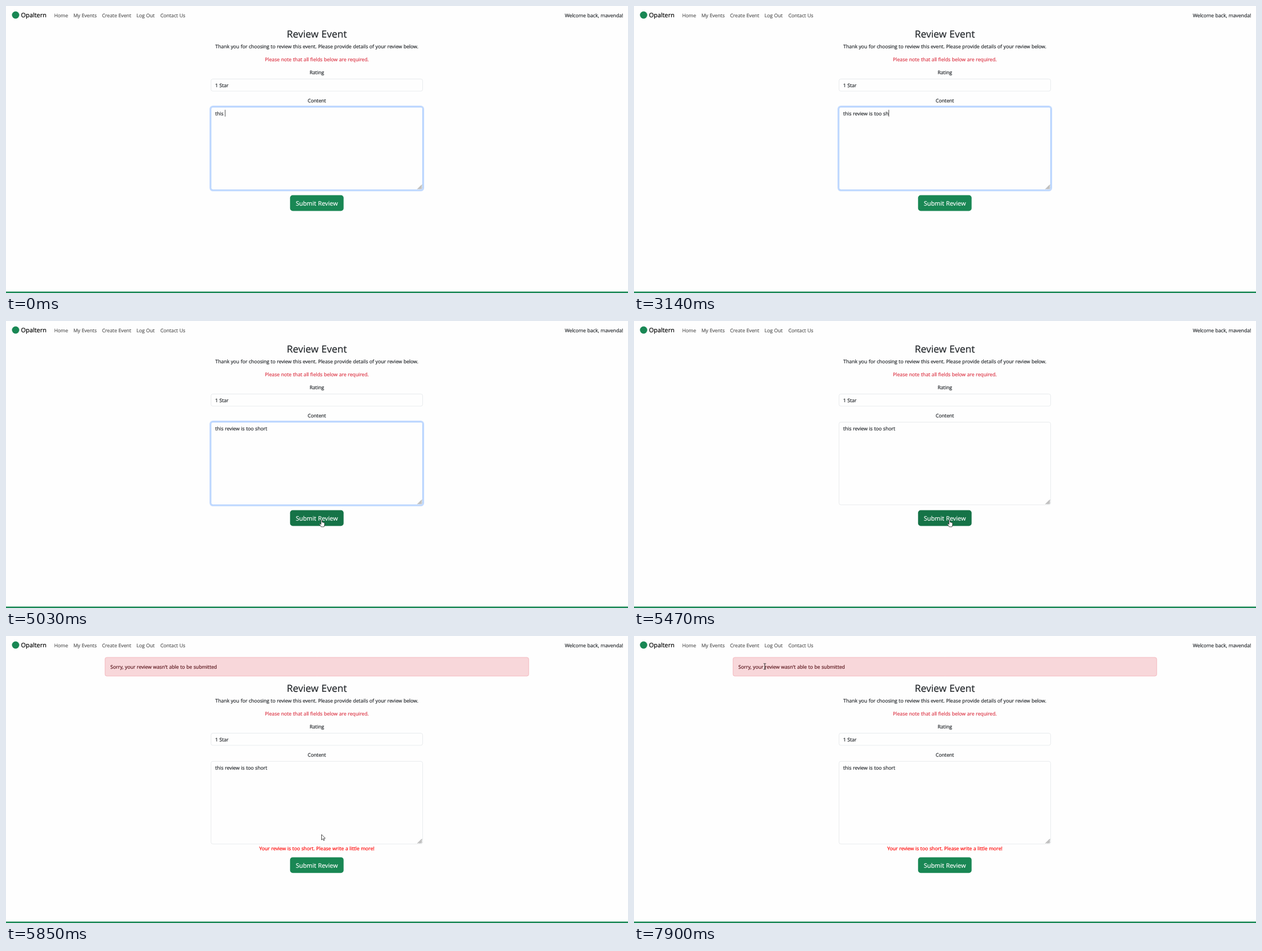
An HTML page with a canvas for the animation above (8 s loop, 1101x509 px).

```html
<!DOCTYPE html>
<html lang="en">
<head>
<meta charset="utf-8">
<title>Review Event</title>
<style>
  html, body { margin: 0; width: 100%; height: 100%; overflow: hidden; background: #fefefe; }
  canvas { display: block; }
</style>
</head>
<body>
<canvas id="stage" width="1101" height="509"></canvas>
<script>
const ctx = document.getElementById('stage').getContext('2d');
const LOOP = 8000;
const MID = 550.2;
const FIELD = { x: 362.6, w: 375.2 };
const BODY = 8.7, LARGE = 10.88, TITLE = 17.4;
const INK = '#212529', GREEN = '#198754', PAPER = '#fefefe', BORDER = '#dee2e6';
const REVIEW = 'this review is too short';

// [time, number of characters typed]
const typing = [
  [0, 5], [650, 0], [1310, 2], [1450, 4], [1590, 6], [1840, 7], [1990, 8],
  [2110, 10], [2230, 11], [2350, 13], [2480, 15], [2600, 16], [2720, 17],
  [2860, 18], [2980, 20], [3140, 21], [3290, 22], [3410, 24]
];
// [time, caret shown]
const blinking = [
  [0, true], [530, false], [650, true], [1190, false], [1310, true],
  [3950, false], [4430, true], [5030, false]
];
// [time, pointer shape, x, y]
const pointing = [
  [0, null],
  [3950, 'beam', 454.5, 182.5], [4070, 'beam', 461, 190], [4190, 'beam', 480, 212],
  [4310, 'beam', 516, 250], [4430, 'beam', 556.5, 294.5], [4550, 'beam', 572, 322],
  [4670, 'arrow', 575.5, 371], [4790, 'hand', 565, 356], [4910, 'hand', 560, 353],
  [5030, 'hand', 558.5, 352], [5730, 'arrow', 558.5, 352],
  [5970, 'beam', 556.5, 351.5], [6220, 'beam', 549.5, 319.5],
  [6370, 'arrow', 380.5, 117.5], [6520, 'arrow', 322, 73], [6650, 'beam', 304.5, 56],
  [6790, 'arrow', 262, 43], [6910, 'arrow', 205, 39.5], [7040, 'beam', 187.5, 56],
  [7160, 'arrow', 225, 83], [7280, 'arrow', 299, 80], [7420, 'beam', 368, 58],
  [7540, 'arrow', 345, 36], [7660, 'arrow', 290, 29.5], [7780, 'arrow', 240, 37],
  [7900, 'beam', 231.5, 54]
];
const focusing = [[0, 1], [5310, 0.5], [5470, 0]];
const hovering = [[0, 0], [4790, 0.5], [4910, 1], [5730, 0]];

// Latest entry whose time has come.
const at = (track, t) => track.filter(([start]) => start <= t).pop();
const mix = (a, b, k) => `rgb(${a.map((v, i) => Math.round(v + (b[i] - v) * k))})`;

function text(str, x, y, { size = BODY, color = INK, align = 'left' } = {}) {
  ctx.font = `${size}px "Open Sans", "Noto Sans", sans-serif`;
  ctx.wordSpacing = `${size * 0.03}px`;
  ctx.textAlign = align;
  ctx.fillStyle = ctx.strokeStyle = color;
  ctx.lineWidth = 0.2;
  ctx.fillText(str, x, y);
  ctx.strokeText(str, x, y);
}

const centered = (str, y, options) => text(str, MID, y, { align: 'center', ...options });

function box(x, y, w, h, { fill, stroke, radius = 3.5 }) {
  ctx.beginPath();
  ctx.roundRect(x, y, w, h, radius);
  ctx.fillStyle = fill;
  ctx.fill();
  if (!stroke) return;
  ctx.beginPath();
  ctx.roundRect(x + 0.3, y + 0.3, w - 0.6, h - 0.6, radius - 0.3);
  ctx.strokeStyle = stroke;
  ctx.lineWidth = 0.7;
  ctx.stroke();
}

function lines(segments, color, width) {
  ctx.beginPath();
  for (const [x1, y1, x2, y2] of segments) {
    ctx.moveTo(x1, y1);
    ctx.lineTo(x2, y2);
  }
  ctx.strokeStyle = color;
  ctx.lineWidth = width;
  ctx.stroke();
}

function navbar(hasLogo) {
  const shift = hasLogo ? 0 : -18.5;
  const baseline = hasLogo ? 19.6 : 18.4;
  if (hasLogo) {
    ctx.beginPath();
    ctx.arc(17, 16, 6.5, 0, Math.PI * 2);
    ctx.fillStyle = GREEN;
    ctx.fill();
  }
  text('Opaltern', 26.6 + shift, hasLogo ? 19.8 : 19.1, { size: LARGE, color: '#000' });
  const links = [['Home', 85.2], ['My Events', 119.2], ['Create Event', 170],
                 ['Log Out', 230.9], ['Contact Us', 273.2]];
  for (const [label, x] of links) text(label, x + shift, baseline, { color: '#595959' });
  text('Welcome back, mavenda!', 1092.4, baseline, { align: 'right' });
}

function alertBox(y) {
  box(175, y, 750.5, 33.6, { fill: '#f8d7da', stroke: '#f1aeb5' });
  text("Sorry, your review wasn't able to be submitted", 184.8, y + 20.6, { color: '#58151c' });
}

function textarea(y, t) {
  const focus = at(focusing, t)[1];
  const h = 147.2;
  if (focus) {
    box(FIELD.x - 2.3, y - 2.3, FIELD.w + 4.6, h + 4.6,
      { fill: `rgba(13,110,253,${0.25 * focus})`, radius: 5.8 });
  }
  box(FIELD.x, y, FIELD.w, h,
    { fill: PAPER, stroke: mix([222, 226, 230], [134, 183, 254], focus) });

  const right = FIELD.x + FIELD.w - 1.5, bottom = y + h - 1.5;
  lines([7.5, 5, 2.5].map(d => [right - d, bottom, right, bottom - d]), '#444', 0.8);

  const typed = REVIEW.slice(0, at(typing, t)[1]);
  text(typed, 370.2, y + 14.8);
  if (focus && at(blinking, t)[1]) {
    ctx.fillStyle = '#222';
    ctx.fillRect(370.3 + ctx.measureText(typed).width, y + 5, 0.8, 12);
  }
}

function form(shift, failed, t) {
  ctx.save();
  ctx.translate(0, shift);
  centered('Review Event', 56.3, { size: TITLE });
  centered('Thank you for choosing to review this event. Please provide details of your review below.', 75);
  centered('Please note that all fields below are required.', 98.3, { color: '#dc3545' });
  centered('Rating', 121.4);
  box(FIELD.x, 129.2, FIELD.w, 22.1, { fill: PAPER, stroke: BORDER });
  text('1 Star', 370.2, 144);
  centered('Content', 171.3);
  textarea(179.1, t);
  if (failed) {
    centered('Your review is too short. Please write a little more!', 337.2, { color: '#f00' });
    ctx.translate(0, 13.9);
  }
  box(502.8, 335.6, 94.8, 27.8,
    { fill: mix([25, 135, 84], [21, 115, 71], at(hovering, t)[1]), radius: 4.6 });
  centered('Submit Review', 354.4, { size: LARGE, color: '#fff' });
  ctx.restore();
}

const outlines = {
  arrow: 'M0 0 L0 9.6 L2.2 7.6 L3.7 10.8 L5.2 10.1 L3.8 7 L6.7 6.8 Z',
  hand: 'M-.9 1 Q0 -.4 .9 1 L.9 5 Q2 4.1 2.6 5.4 Q3.7 4.6 4.2 5.9 Q5.4 5.5 5.5 7 ' +
        'L5.3 10 L4.4 13 L-.5 13 L-3.6 8.6 Q-3.5 7 -2 7.8 L-.9 9 Z'
};

function pointer([, shape, x, y]) {
  if (!shape) return;
  ctx.save();
  ctx.translate(x, y);
  if (shape === 'beam') {
    lines([[0, -4.7, 0, 4.7], [-2.2, -5, 2.2, -5], [-2.2, 5, 2.2, 5]], '#222', 0.9);
  } else {
    const path = new Path2D(outlines[shape]);
    ctx.fillStyle = '#fff';
    ctx.fill(path);
    ctx.strokeStyle = '#222';
    ctx.lineWidth = 0.8;
    ctx.lineJoin = 'round';
    ctx.stroke(path);
  }
  ctx.restore();
}

function draw(t) {
  const failed = t >= 5730;
  const hasLogo = !failed || t >= 5850;
  const lift = hasLogo ? 0 : -2.5;
  ctx.textRendering = 'geometricPrecision';
  ctx.fillStyle = PAPER;
  ctx.fillRect(0, 0, 1101, 509);
  navbar(hasLogo);
  if (failed) alertBox(37.7 + lift);
  form(failed ? 42.9 + lift : 0, failed, t);
  ctx.fillStyle = GREEN;
  ctx.fillRect(0, 506.5, 1101, 2.5);
  pointer(at(pointing, t));
}

const begin = performance.now();
function tick() {
  draw((performance.now() - begin) % LOOP);
  requestAnimationFrame(tick);
}
tick();
</script>
</body>
</html>
```
